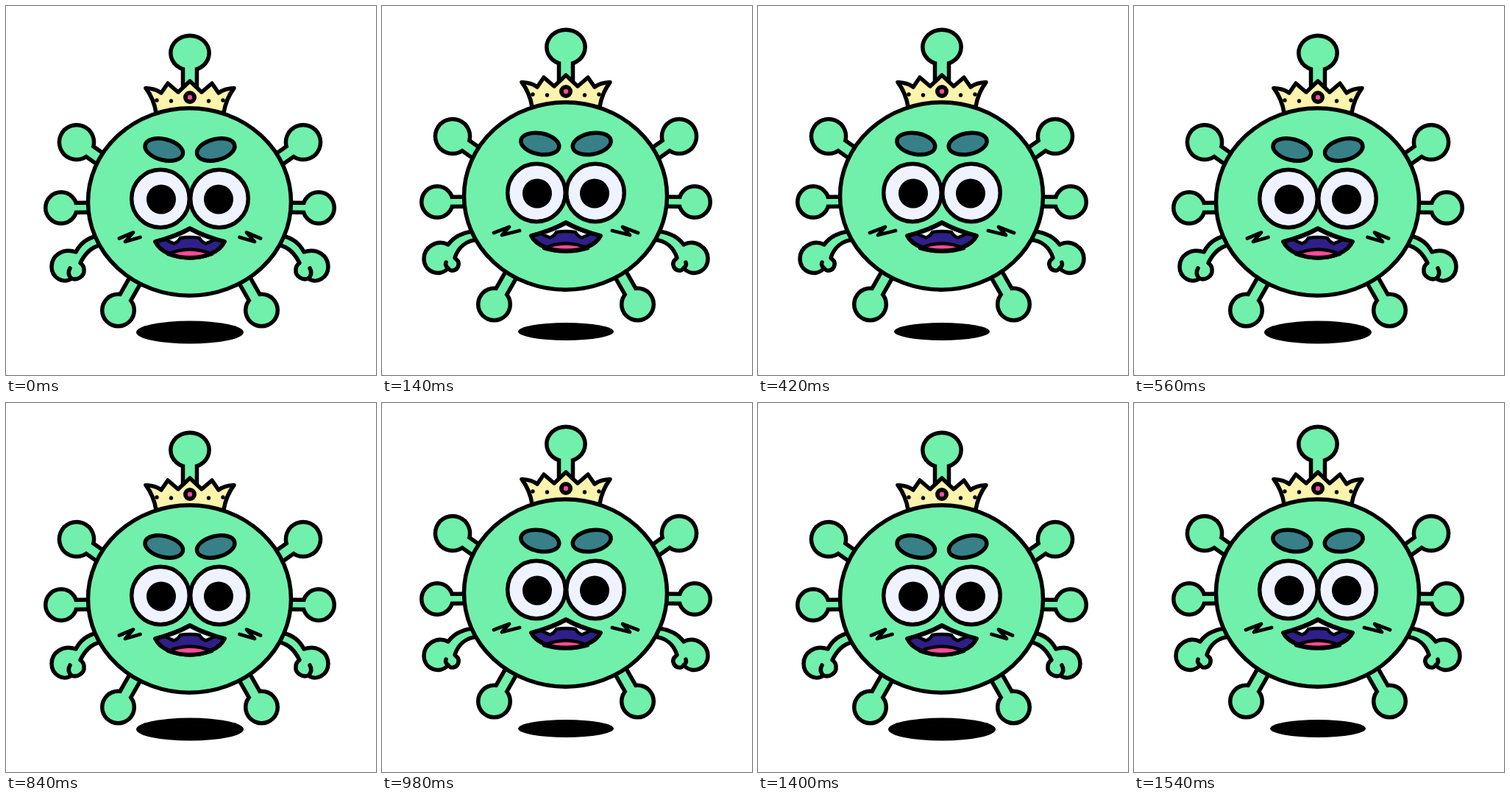
An HTML page for the animation above (1.68 s loop, 503 by 501 pixels).

```html
<!DOCTYPE html>
<html lang="en">
<head>
<meta charset="utf-8">
<title>Bouncing germ king</title>
<style>
  html, body { margin: 0; width: 100%; height: 100%; overflow: hidden; background: #fff; }
  svg { display: block; width: 100%; height: 100%; }
</style>
</head>
<body>
<svg id="stage" viewBox="0 0 503 501" fill="none" stroke="#000" stroke-width="5.5"
     stroke-linecap="round" stroke-linejoin="round"></svg>
<script>
const GREEN = '#70f0ab', LIGHT = '#eff2ff', TEAL = '#378088', NAVY = '#2e1f8a',
      PINK = '#ff4b98', GOLD = '#fcf3ad';
const STEP = 140, STEPS = 12, BLINK_STEP = 2;
const stage = document.getElementById('stage');

const path = (d, fill = 'none', extra = '') => `<path d="${d}" fill="${fill}" ${extra}/>`;
const ellipse = (x, y, rx, ry, fill, extra = '') =>
  `<ellipse cx="${x}" cy="${y}" rx="${rx}" ry="${ry}" fill="${fill}" ${extra}/>`;
const dot = (x, y, r, fill = '#000') => ellipse(x, y, r, r, fill, 'stroke="none"');

// Repeats a left-hand part on the right.
const mirrored = part => part + `<g transform="translate(500) scale(-1 1)">${part}</g>`;

// A ball on a stalk: the black silhouette first, then a thinner green one.
function knob(x, y, rx, ry, endX, endY, width) {
  const layer = (color, grow) =>
    `<path d="M${x} ${y}L${endX} ${endY}" stroke="${color}" stroke-width="${width + 2 * grow}"/>` +
    ellipse(x, y, rx + grow, ry + grow, color, 'stroke="none"');
  return layer('#000', 2.75) + layer(GREEN, -2.75);
}

const limbs = knob(250, 63.8, 26.2, 23.6, 250, 120, 19) + mirrored(
  knob(96, 185, 23.6, 23.6, 140, 216, 17) +
  knob(75, 274, 21.3, 21.3, 125, 273.5, 13) +
  knob(152.5, 413, 21.8, 21.8, 177, 370, 17));

const armDown = path('M124 312C111 315 101 322 95 334C77 328 62 339 62 354C62 369 78 378 89 370' +
  'C97 373 107 367 106 358C106 354 104 351 101 349C107 337 115 327 131 324', GREEN) +
  path('M89 370C85 366 84 361 87 356');
const armUp = path('M124 314C108 316 97 322 90 332C74 324 57 336 57 351C57 369 78 377 90 364' +
  'C91 366 94 368 97 367C103 366 106 359 103 354L99 350C103 337 113 326 132 325', GREEN) +
  path('M90 364C87 362 86 359 87 356');

const crown = path('M204 145Q201 126 190 111.5Q203 112 211 118L220 105L234 117L250 102' +
  'L266 117L280 105L289 118Q297 112 310 111.5Q299 126 296 145Z', GOLD) +
  dot(250, 124, 9) + dot(250, 124, 3.2, PINK) + mirrored(dot(224.5, 129, 2.7) + dot(205, 128, 2.7));

const body = ellipse(249.5, 266, 138, 127.2, GREEN);
const brows = tilt => mirrored(ellipse(214.8, 195, 26.3, 14.2, TEAL, `transform="rotate(${tilt} 214.8 195)"`));
const openEyes = mirrored(ellipse(210, 261.5, 39.3, 39.3, LIGHT) + dot(211, 262.5, 20));
const shutEyes = mirrored(path('M170 248Q215 261 250 262Q218 271 175 277'));

function mouth(low) {
  const lips = `M203 320Q230 313 250 302Q270 313 297 320C284 ${low} 216 ${low} 203 320Z`;
  return path(lips, NAVY) +
    path('M216 317Q236 311 250 303Q264 311 284 317L272 322.5Q266 321 263 315Q250 313 237 315' +
      'Q234 321 228 322.5Z', LIGHT, 'stroke-width="4.5"') +
    path(`M220 337Q250 324 280 337Q250 ${low - 1} 220 337Z`, PINK, 'stroke-width="4.5"') +
    path(lips);
}

const cheek = d => mirrored(path(d, 'none', 'stroke-width="4.8"'));
const cheeksDown = cheek('M154 315.5L173 307.5L162 320L182.5 314');
const cheeksUp = cheek('M152 316L173 308L163 319L187 313');

function pose(raised, blinking) {
  const shadow = raised ? ellipse(250, 442, 65, 12, '#000', 'stroke="none"')
                        : ellipse(250, 443, 73, 15.5, '#000', 'stroke="none"');
  return shadow + `<g transform="translate(0 ${raised ? -8 : 0})">` +
    limbs + mirrored(raised ? armUp : armDown) + crown + body +
    brows(raised ? 11 : 14) + (blinking ? shutEyes : openEyes) +
    mouth(raised ? 347 : 349) + (raised ? cheeksUp : cheeksDown) + '</g>';
}

let shown = -1;
function draw() {
  const step = Math.floor(performance.now() / STEP) % STEPS;
  if (step !== shown) {
    stage.innerHTML = pose(step % 2 === 1, step === BLINK_STEP);
    shown = step;
  }
  requestAnimationFrame(draw);
}
draw();
</script>
</body>
</html>
```
